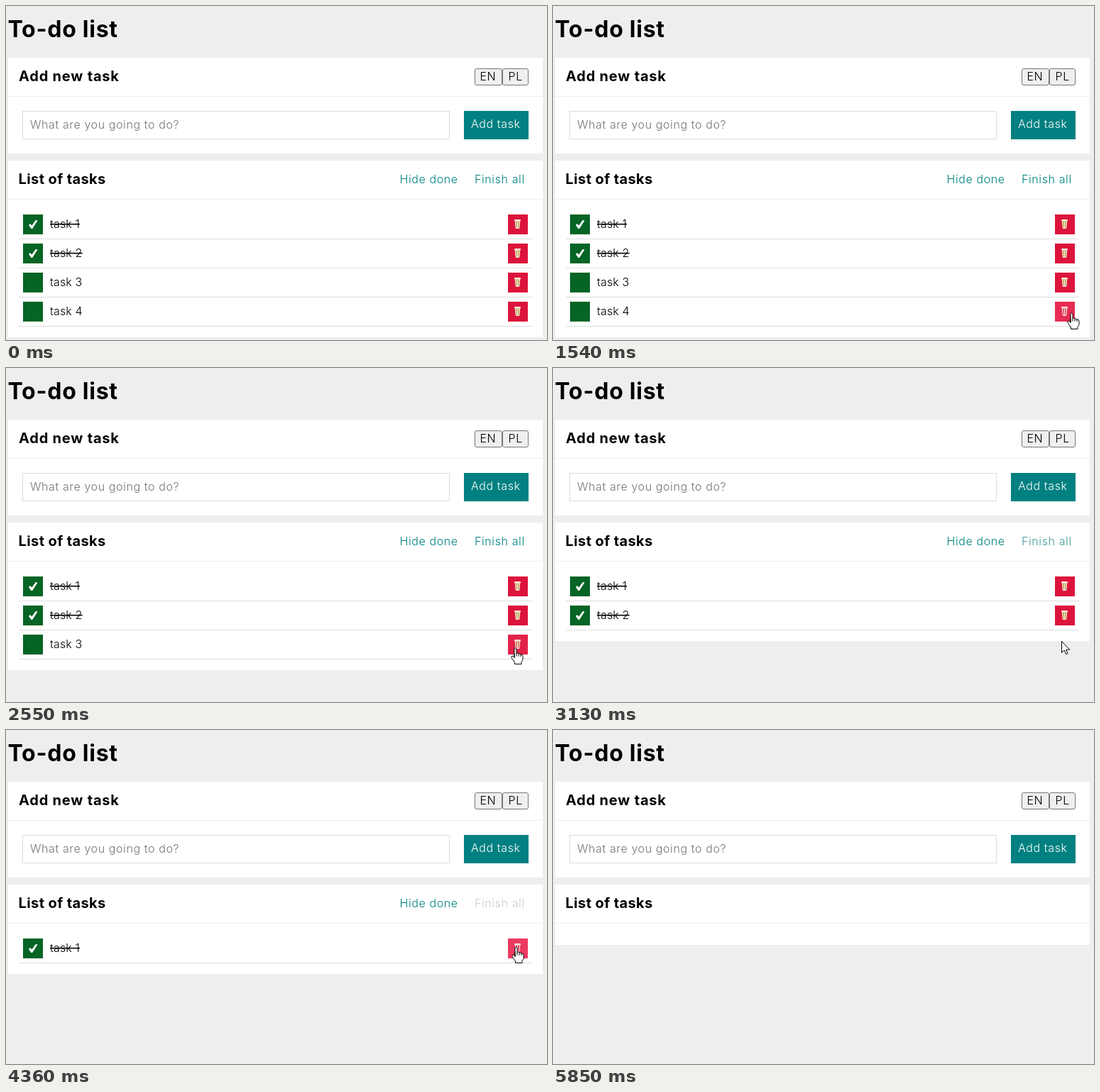
These frames come from a looping animation (762x471 px, 6.31 s). An HTML page:

```html
<!DOCTYPE html>
<html lang="en">
<head>
<meta charset="utf-8">
<title>To-do list</title>
<style>
  html, body { margin: 0; width: 100%; height: 100%; overflow: hidden; background: #eee; }
  svg { display: block; width: 762px; height: 471px; }
  text { font: 350 16px Inter, sans-serif; letter-spacing: .6px; }
  .title { font-size: 32px; font-weight: 700; letter-spacing: .75px; }
  .heading { font-size: 20px; font-weight: 700; letter-spacing: .8px; }
  .task { letter-spacing: .15px; }
  .done { text-decoration: line-through; }
  .button { fill: #efefef; stroke: #767676; }
  .cursor path { fill: #fff; stroke: #000; stroke-linejoin: round; }
</style>
</head>
<body>
<svg viewBox="0 0 762 471">
  <rect width="762" height="471" fill="#eee"/>
  <text class="title" x="2.5" y="44">To-do list</text>

  <rect x="3" y="73" width="753" height="135" fill="#fff"/>
  <rect x="3" y="127" width="753" height="1" fill="#eee"/>
  <text class="heading" x="18" y="106">Add new task</text>
  <rect class="button" x="660.5" y="88.5" width="38" height="23" rx="2.5"/>
  <rect class="button" x="699.5" y="88.5" width="36" height="23" rx="2.5"/>
  <text x="667.5" y="105">EN</text>
  <text x="707.5" y="105">PL</text>
  <rect x="23.5" y="148.5" width="601" height="39" fill="#fff" stroke="#ddd"/>
  <text x="34" y="173" fill="#757575">What are you going to do?</text>
  <rect x="645" y="148" width="91" height="40" fill="teal"/>
  <text x="655" y="172" fill="#fff">Add task</text>

  <rect id="card" x="3" y="218" width="753" fill="#fff"/>
  <rect x="3" y="272" width="753" height="1" fill="#eee"/>
  <text class="heading" x="17.5" y="251" style="letter-spacing:.4px">List of tasks</text>
  <g id="links" fill="teal">
    <text x="554.5" y="250">Hide done</text>
    <text id="finish" x="660" y="250">Finish all</text>
  </g>
  <g id="rows"></g>

  <g id="cursor" class="cursor">
    <circle id="click" r="12" fill="#ffa51f" opacity=".8"/>
    <path id="arrow" d="M.5 .5V16.5L4.2 13 6.7 18.6 9 17.6 6.6 12.2H11.7Z"/>
    <path id="hand" transform="translate(.5 .5)" d="M-1.5 1.5Q0-.5 1.5 1.5V8Q3.5 6.5 4.5 8.7 6.5 7.5 7.5 9.5 10.5 9 10.5 12V16Q10.5 18 8.5 20V23H-1V20.5L-5 15Q-6.5 12-4.5 11.5-3 11.5-1.5 14ZM-1.5 14V8M1.5 8v4M4.5 8.7v3.5M7.5 9.5v3"/>
  </g>
</svg>
<script>
const LOOP = 6310, ROW = 41, CLICK = 140, HOVER_FADE = 250;
const CRIMSON = [220, 20, 60], HOVERED = [237, 58, 96];
const TEAL = [0, 128, 128], DISABLED = [204, 204, 204];

// Times at which the pointer enters each delete button and the task goes away.
const tasks = [
  { name: 'task 1', done: true, hover: 4050, gone: 4770 },
  { name: 'task 2', done: true, hover: 3290, gone: 3890 },
  { name: 'task 3', hover: 2460, gone: 2960 },
  { name: 'task 4', hover: 1380, gone: 2280 },
];

// Pointer path: time, x, y.
const path = [
  [1070, 739, 444], [1270, 739, 444], [1540, 730, 432], [1810, 724, 428],
  [2280, 724, 428], [2550, 717, 394], [2750, 716, 385], [3130, 716, 385],
  [3400, 723, 348], [3890, 723, 347], [4080, 719, 317], [4290, 718, 305],
  [5360, 718, 305], [5850, 723, 472],
];

const $ = id => document.getElementById(id);
const clamp = v => Math.max(0, Math.min(1, v));
const lerp = (a, b, p) => a + (b - a) * p;
const mix = (a, b, p) => `rgb(${a.map((v, i) => Math.round(lerp(v, b[i], p)))})`;
const show = (el, on) => el.setAttribute('display', on ? 'inline' : 'none');

$('rows').innerHTML = tasks.map(({ name, done }, i) => `
  <g transform="translate(0 ${294 + i * ROW})">
    <rect x="24" width="28" height="28" fill="#066424"/>
    ${done ? '<path d="M32 15l2-2 2.4 2.6L41.8 8l2.7.4L37.2 20h-1.7z" fill="#fff"/>' : ''}
    <text class="task ${done ? 'done' : ''}" x="62" y="19">${name}</text>
    <rect class="delete" x="707" width="28" height="28"/>
    <path class="paper" d="M717 9h7l-1 11h-5z" fill="#c9ad62"/>
    <path d="M717.3 9.5l1 10h4.4l1-10M720.5 10v9" fill="none" stroke="#f8e9e4"/>
    <rect x="716" y="7" width="9" height="2.4" rx="1" fill="#f8e9dc"/>
    <rect x="18" y="34" width="723" height="1" fill="#ddd"/>
  </g>`).join('');
const rows = [...$('rows').children];

function pointerAt(t) {
  const i = path.findIndex(key => key[0] > t);
  if (i < 1) return null;
  const [t0, x0, y0] = path[i - 1], [t1, x1, y1] = path[i];
  const p = (t - t0) / (t1 - t0);
  return [lerp(x0, x1, p), lerp(y0, y1, p)].map(Math.round);
}

function draw(t) {
  const left = tasks.filter(task => t < task.gone).length;
  $('card').setAttribute('height', 85 + left * ROW);
  show($('links'), left > 0);
  $('finish').setAttribute('fill', mix(TEAL, DISABLED, clamp((t - tasks[2].gone) / 500)));

  rows.forEach((row, i) => {
    const lit = clamp((t - tasks[i].hover) / HOVER_FADE);
    show(row, t < tasks[i].gone);
    row.querySelector('.delete').setAttribute('fill', mix(CRIMSON, HOVERED, lit));
    row.querySelector('.paper').setAttribute('opacity', 1 - lit);
  });

  const pointer = pointerAt(t);
  show($('cursor'), pointer);
  if (!pointer) return;
  $('cursor').setAttribute('transform', `translate(${pointer})`);
  const hovering = tasks.some(task => t >= task.hover && t < task.gone);
  show($('hand'), hovering);
  show($('arrow'), !hovering);
  show($('click'), tasks.some(task => t >= task.gone - CLICK && t < task.gone));
}

function tick() {
  draw(performance.now() % LOOP);
  requestAnimationFrame(tick);
}
tick();
</script>
</body>
</html>
```
